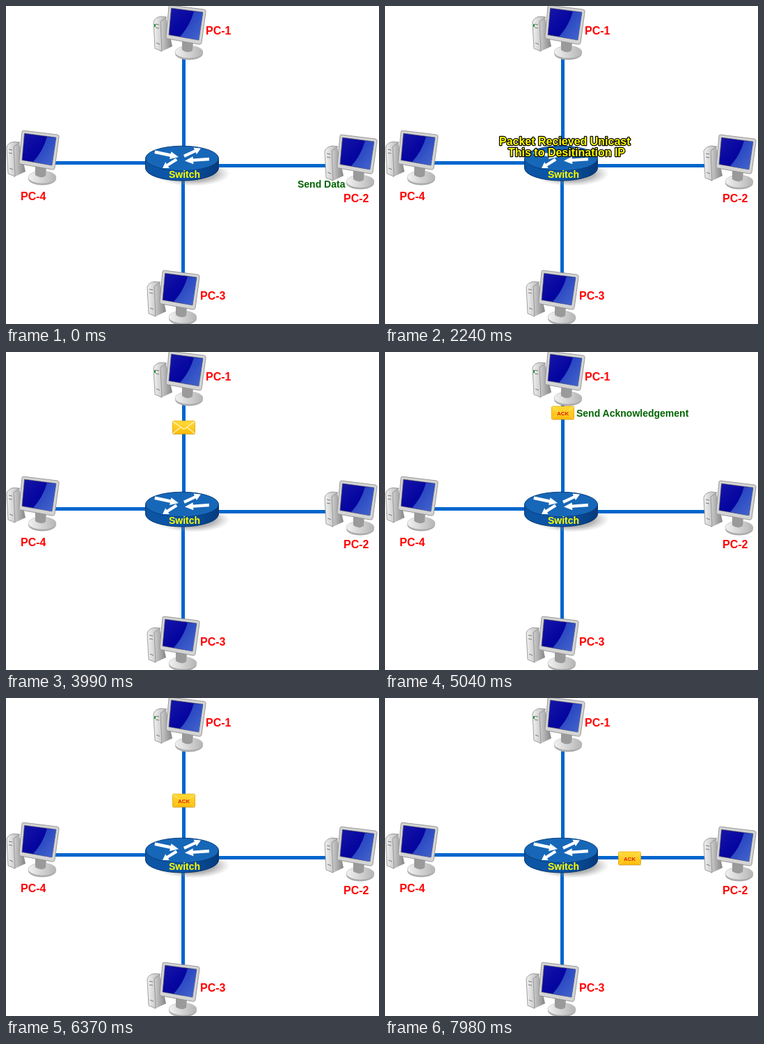
Animation, 536 px wide and 457 px high, one loop 8 s. Source, as an HTML page:

```html
<!DOCTYPE html>
<html lang="en">
<head>
<meta charset="utf-8">
<title>Switch unicast</title>
<style>
  html, body { margin: 0; width: 100%; height: 100%; overflow: hidden; background: #fff; }
  svg { display: block; width: 536px; height: 457px; }
  text { font: bold 14px "Liberation Sans", Arial, sans-serif; }
  .name { font-size: 16px; fill: #f00; }
  .action { fill: #006400; }
  .notice { fill: #ff0; stroke: #000; stroke-width: 2.4px; paint-order: stroke; stroke-linejoin: round; }
  .big { font-size: 16px; }
  .off { display: none; }
</style>
</head>
<body>
<svg viewBox="0 0 536 457">
  <defs>
    <linearGradient id="screen" x1="0" y1="0" x2="1" y2="1">
      <stop offset="0" stop-color="#1717a8"/><stop offset=".5" stop-color="#0505a0"/>
      <stop offset="1" stop-color="#0a0a8c"/>
    </linearGradient>
    <linearGradient id="glare" x1="0" y1="0" x2="1" y2="1">
      <stop offset="0" stop-color="#2448c0"/><stop offset="1" stop-color="#5a86e4"/>
    </linearGradient>
    <linearGradient id="silver">
      <stop offset="0" stop-color="#f2f2f2"/><stop offset="1" stop-color="#b4b4b4"/>
    </linearGradient>
    <linearGradient id="tower">
      <stop offset="0" stop-color="#d8d8d8"/><stop offset="1" stop-color="#858585"/>
    </linearGradient>
    <linearGradient id="gold" x1="0" y1="0" x2="0" y2="1">
      <stop offset="0" stop-color="#ffdc3c"/><stop offset="1" stop-color="#fcbc08"/>
    </linearGradient>
    <linearGradient id="side">
      <stop offset="0" stop-color="#0d55a4"/><stop offset=".5" stop-color="#0b55a8"/>
      <stop offset="1" stop-color="#063a7c"/>
    </linearGradient>
    <radialGradient id="shade">
      <stop offset=".6" stop-color="#777" stop-opacity=".55"/><stop offset="1" stop-color="#999" stop-opacity="0"/>
    </radialGradient>
    <g id="pc">
      <path d="M9 20L19 18L28 60L11 68Z" fill="url(#tower)"/>
      <path d="M1 25Q3 18 12 17L20 18L11 24L13 67L3 63Z" fill="url(#silver)" stroke="#8a8a8a" stroke-width=".8"/>
      <path d="M4 28L9 29M4 33L9 34M5 55L10 57" stroke="#777"/>
      <ellipse cx="52" cy="70" rx="20" ry="9.5" fill="#aaa"/>
      <ellipse cx="52" cy="68" rx="20" ry="9" fill="url(#silver)" stroke="#bbb" stroke-width=".6"/>
      <path d="M42 50L58 54L57 66Q50 71 42 65Z" fill="#9a9a9a"/>
      <path d="M25 1L74 7Q77 8 76 11L70 55Q69 58 66 57L21 49Q18 48 19 45L23 3Q23 1 25 1Z"
            fill="#d4d4d4" stroke="#8f8f8f" stroke-width=".9"/>
      <path d="M26.500 5L72 11L66 51L23 43.500Z" fill="url(#screen)" stroke="#555" stroke-width=".6"/>
      <path d="M59 10L72 11L66 51L39 46Q53 31 59 10Z" fill="url(#glare)" opacity=".75"/>
    </g>
    <path id="arrow" d="M0 0L-12 -5.500V-2.200H-35V2.200H-12V5.500Z" fill="#fff"/>
  </defs>

  <rect width="536" height="457" fill="#fff"/>
  <path d="M255.500 75V205M254.500 245V384M70 225.500H205M300 229.500H460" stroke="#0066cc" stroke-width="5"/>

  <use href="#pc" x="211" y="-2"/>
  <use href="#pc" x="457" y="184"/>
  <use href="#pc" x="202" y="379"/>
  <use href="#pc" x="0" y="178"/>
  <rect x="213" y="26" width="2" height="4" fill="#1c9a2c"/>

  <ellipse cx="268" cy="241" rx="54" ry="18" fill="url(#shade)"/>
  <path d="M200.500 219V233A52.500 18 0 0 0 305.500 233V219Z" fill="url(#side)" stroke="#06376f"/>
  <ellipse cx="253" cy="219" rx="52.500" ry="17.800" fill="#1767b8" stroke="#073f7d"/>
  <use href="#arrow" transform="translate(248 217) rotate(12)"/>
  <use href="#arrow" transform="translate(280 204.500) rotate(-25) scale(.76 .95)"/>
  <use href="#arrow" transform="translate(257 222.500) rotate(176)"/>
  <use href="#arrow" transform="translate(225 233) rotate(148) scale(.68 .95)"/>
  <text x="234" y="247" fill="#ff0">Switch</text>

  <text class="name" x="287" y="41">PC-1</text>
  <text class="name" x="485" y="282">PC-2</text>
  <text class="name" x="279" y="422">PC-3</text>
  <text class="name" x="21" y="279">PC-4</text>

  <g id="envelope">
    <rect x="1" y="2" width="33" height="19" rx="2" fill="#b88a20" opacity=".35"/>
    <rect x="1.500" y="1" width="32" height="18.500" rx="1.500" fill="url(#gold)" stroke="#e8a70c" stroke-width=".8"/>
    <path id="flap" d="M2 2L16 12Q17.500 13 19 12L33 2M2 19L13 10M33 19L22 10" fill="none" stroke="#fff3c0" stroke-width="1.300"/>
    <text id="ack" x="9" y="14" fill="#e02000" style="font-size:8px">ACK</text>
  </g>

  <text id="send" class="action" x="419" y="261">Send Data</text>
  <text id="match" class="action" x="275" y="93">IP Matched</text>
  <text id="reply" class="action" x="275" y="93">Send Acknowledgement</text>
  <g id="packetNotice">
    <text class="notice big" x="164" y="200">Packet Recieved Unicast</text>
    <text class="notice big" x="177" y="216">This to Desitination IP</text>
  </g>
  <g id="ackNotice" text-anchor="middle">
    <text class="notice" x="265.500" y="203">Acknowledgement Recieved</text>
    <text class="notice" x="265.500" y="218">Unicast to Desitination IP</text>
  </g>
</svg>
<script>
  const LOOP = 8000, STEP = 70;
  const el = id => document.getElementById(id);

  // Step ranges [first, end) in which each caption is visible.
  const captions = {
    send: [0, 10], packetNotice: [32, 42], match: [62, 72], reply: [72, 82], ackNotice: [99, 109]
  };

  const show = (id, on) => el(id).classList.toggle('off', !on);

  function envelopeAt(s) {
    if (s < 10) return null;
    if (s < 32) return [378 - 6.09 * (s < 19 ? s - 18 : s - 19), 218];
    if (s < 42) return null;
    if (s < 56) return [238, 181 - 6 * Math.max(0, s - 43)];
    if (s < 72) return [238, Math.max(77, 109 - 16 / 3 * (s - 55))];
    if (s < 99) return [238, 77 + 6 * Math.max(0, s - 81)];
    if (s < 109) return null;
    return [304 + 6 * (s - 109), 220];
  }

  function draw() {
    const s = Math.floor(performance.now() % LOOP / STEP);
    for (const [id, [first, end]] of Object.entries(captions)) show(id, s >= first && s < end);
    const pos = envelopeAt(s);
    show('envelope', pos);
    if (pos) el('envelope').setAttribute('transform', `translate(${pos.map(Math.round)})`);
    show('ack', s >= 72);
    el('flap').setAttribute('opacity', s >= 72 ? 0.25 : 1);
    requestAnimationFrame(draw);
  }
  draw();
</script>
</body>
</html>
```
